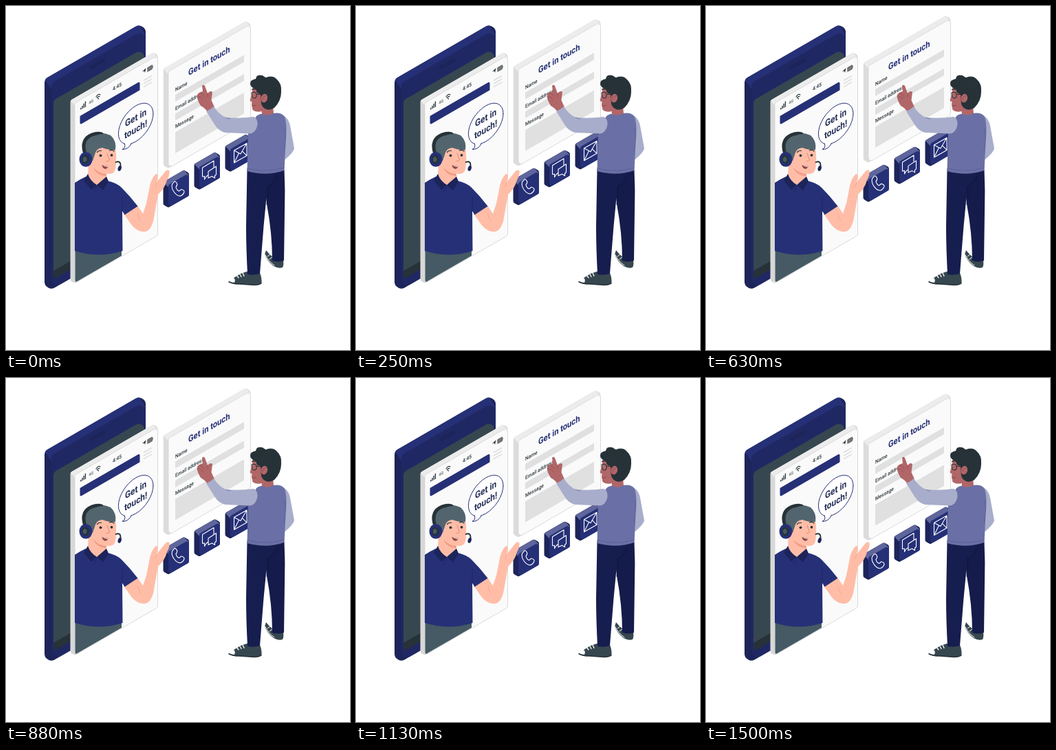
Write an HTML page with a canvas that moves like this. It is 500 by 500 pixels and loops after 1.54 s.

```html
<!DOCTYPE html>
<html lang="en">
<head>
<meta charset="utf-8">
<title>Get in touch</title>
<style>
html, body { margin: 0; width: 100%; height: 100%; overflow: hidden; background: #fff; }
canvas { display: block; width: 500px; height: 500px; }
</style>
</head>
<body>
<canvas id="stage" width="500" height="500"></canvas>
<script>
const ctx = document.getElementById('stage').getContext('2d');
const LOOP = 1540, STEPS = 37, LIFT = 10, SLOPE = Math.tan(Math.PI / 6);
const NAVY = '#263077', DEEP = '#1c2459', INK = '#263238', GREY = '#37474f';
const PEACH = '#ffbda7', BROWN = '#b16668', MAUVE = '#6a70a5', LILAC = '#a8adcb';

function fill(color, d) {
  ctx.fillStyle = color;
  ctx.fill(new Path2D(d));
}

function line(color, width, d) {
  ctx.strokeStyle = color;
  ctx.lineWidth = width;
  ctx.lineCap = ctx.lineJoin = 'round';
  ctx.stroke(new Path2D(d));
}

function oval(color, x, y, rx, ry = rx, turn = 0) {
  ctx.fillStyle = color;
  ctx.beginPath();
  ctx.ellipse(x, y, rx, ry, turn, 0, Math.PI * 2);
  ctx.fill();
}

function roundPoly(points, r) {
  const n = points.length, path = new Path2D();
  const [a, b] = [points[n - 1], points[0]];
  path.moveTo((a[0] + b[0]) / 2, (a[1] + b[1]) / 2);
  points.forEach((p, i) => path.arcTo(...p, ...points[(i + 1) % n], r));
  path.closePath();
  return path;
}

// Upright parallelogram on the isometric wall, from its top left corner.
function wall(x, y, w, h) {
  const rise = w * SLOPE;
  return [[x, y], [x + w, y - rise], [x + w, y - rise + h], [x, y + h]];
}

function pane(color, x, y, w, h, r = 0) {
  ctx.fillStyle = color;
  ctx.fill(roundPoly(wall(x, y, w, h), r));
}

function slab(x, y, w, h, depth, r, side, top, front, edge) {
  const [tl, tr, br, bl] = wall(x, y, w, h);
  const back = ([px, py]) => [px - depth, py - depth * SLOPE];
  const hull = roundPoly([back(tl), back(tr), tr, br, bl, back(bl)], r);
  ctx.fillStyle = side;
  ctx.fill(hull);
  ctx.save();
  ctx.clip(hull);
  ctx.fillStyle = top;
  ctx.fill(roundPoly([back(tl), back(tr), [tr[0], tr[1] + r], [tl[0], tl[1] + r]], 0));
  ctx.restore();
  const face = roundPoly([tl, tr, br, bl], r);
  ctx.fillStyle = front;
  ctx.fill(face);
  if (edge) {
    ctx.strokeStyle = edge;
    ctx.lineWidth = 0.7;
    ctx.stroke(face);
  }
}

function wallText(text, x, y, size, weight, color) {
  ctx.save();
  ctx.transform(0.866, -0.5, 0, 1, x, y);
  ctx.font = `${weight} ${size}px Roboto, sans-serif`;
  ctx.fillStyle = color;
  ctx.fillText(text, 0, 0);
  ctx.restore();
}

function drawPhone() {
  slab(66, 112, 137, 300, 10, 9, DEEP, NAVY, '#202864');
  pane(GREY, 69, 137, 132, 260, 8);
  fill(INK, 'M69 385L95 370V382L73 395Q69 397 69 392Z');
  line(DEEP, 5, 'M124 89L142 79');
}

function drawScreen() {
  slab(100, 141, 120.5, 262, 6.5, 4, '#d8d8d8', '#ececec', '#fafafa', '#cfcfcf');
  for (let i = 0; i < 4; i++) {
    line(INK, 1.3, `M${108.8 + i * 2.2} ${150 - i * 1.2}v${-1.5 - i * 1.9}`);
  }
  wallText('4G', 120.5, 143, 6, 400, INK);
  line(INK, 1.1, 'M131 132Q134 127 137 129M132.3 133.6Q134.5 130.6 136 131.6');
  oval(INK, 134.2, 134.6, 0.9);
  wallText('4:45', 155, 123.5, 7.6, 500, INK);
  fill(INK, 'M198 95.5L203.5 90L202 97L201 94.5Z');
  pane('#777', 206, 89.5, 6.5, 5.8, 1);
  line(INK, 0.6, 'M206 89.5L212.5 85.7V91.6L206 95.4ZM213.5 87.5V89');
  for (const y of [108, 112.7, 117.4]) line('#dedede', 1.6, `M200.5 ${y}L211.5 ${y - 6.3}`);
  pane(NAVY, 107.5, 160, 87, 12.5, 1.5);
}

function drawBubble() {
  ctx.save();
  ctx.transform(1, -SLOPE, 0, 1, 188.7, 171);
  oval('#fff', 0, 0, 25.3, 26);
  ctx.restore();
  ctx.strokeStyle = NAVY;
  ctx.lineWidth = 1;
  ctx.stroke();
  fill('#fff', 'M172 198Q175 205 169 208.5Q179 208 182 198Z');
  line(NAVY, 1, 'M172.3 200Q174.5 206 169 208.5Q178 208.5 182 200.5');
  wallText('Get in', 173, 176, 13.7, 700, '#263058');
  wallText('touch!', 172, 193.5, 13.7, 700, '#263058');
}

function drawForm() {
  slab(236, 95.3, 119.5, 140.5, 7.3, 4, '#dcdcdc', '#ececec', '#fafafa', '#d2d2d2');
  wallText('Get in touch', 265, 101.5, 12.9, 700, NAVY);
  [['Name', 124.5, 129, 10], ['Email address', 152, 156.5, 10], ['Message', 178, 183.5, 30.5]]
    .forEach(([label, base, top, h]) => {
      wallText(label, 246, base, 7.6, 500, INK);
      pane('#e0e0e0', 246, top, 100, h);
    });
}

const glyphs = [
  'M241.5 259Q240 264 244 270Q249 277 254 276Q258 274 259 270.5Q259.500 267.500 254.500 266.500' +
  'Q252.500 268.500 251.500 269Q248 267.500 247 263Q249.500 260.500 248.500 258Q246.500 254 244.500 255.500Z',
  'M293.500 246L291 248L288.500 252V247.500L285.500 248V235L302 225V234M294 240.500L305.500 233V245' +
  'L303.500 246.500V250L299.500 247.500L294 250Z',
  'M331.500 210L350 199.500V217.500L331.500 228ZM331.500 210L341 215L350 199.500M331.500 228L338.500 214M350 217.500L343.500 211'
];

function drawButtons() {
  glyphs.forEach((glyph, i) => {
    slab(236 + i * 45, 260 - i * 26, 30, 33, 7.5, 3.5, DEEP, '#5f669c', NAVY);
    line('#fff', 1.1, glyph);
  });
}

function drawAgent() {
  fill('#455a64', 'M100.500 354H168V363L103 400.500Q100.500 402 100.500 398Z');
  fill(PEACH, 'M171 302L191 290Q196 297 199 302L204 287L208 267Q210 251 218 244Q221 244 220.500 249' +
    'L219 256L232 240Q235 237.500 237.500 239.500Q238.500 245 234 253Q231 265 221 274' +
    'L214 313Q210 327 202 328Q192 329 183 319Z');
  line('#f29d87', 0.7, 'M219 256L217 263M191.500 302Q192 308 196 313');
  fill(NAVY, 'M100 257Q107 252 116 248L147 254Q161 257 168 264Q180 276 191.500 291L172.500 303.500L169 298' +
    'L169.500 356Q136 367 100 356Z');
  fill(PEACH, 'M120 228L119 246Q124 259 134 261Q144 258 147 253L145 240Z');
  fill('#f29d87', 'M127 235Q136 244 146 244L146 247Q132 247 127 235Z');
  fill(DEEP, 'M119 244L113 254L124 267L132 260Q122 254 119 244ZM132 260L146 248L149 255L141 268Z');
  line(DEEP, 0.8, 'M132 261L128 271M169 298V278');

  fill(PEACH, 'M120 205Q136 193 158 204Q161 214 160 228Q160 240 155 243Q148 246 138 241Q126 236 121 226Z');
  fill('#52656e', 'M114 214Q109 194 124 187Q139 182 152 188Q161 196 159 209Q152 210 140 206' +
    'Q132 207 130 213L126 225L120 226Z');
  line(INK, 5, 'M115 215Q108 194 125 187Q133 184 139 186');
  fill('#52656e', 'M119 211Q116 194 131 188Q144 183 154 191Q160 198 159 207Q150 210 139 205Q132 206 129 213L125 223Z');
  line(INK, 1.2, 'M132.500 212.500Q135 209.500 138.500 210.500M150.500 210Q154 208.500 157 211');
  oval(INK, 137.500, 217.300, 1.9);
  oval(INK, 153.500, 216.800, 1.9);
  line('#e88770', 1, 'M147 214Q149 220 150.500 224Q149 226.500 146 225.500');
  fill('#8f4547', 'M139.500 231Q144 233 148.500 232.500Q147 238 143 236.500Q140 235 139.500 231Z');
  fill('#fff', 'M140 231.300Q144 233.200 148.300 232.700L147.500 234Q143 234 140 231.300Z');
  oval(NAVY, 116, 223, 9.5, 10.8);
  oval(INK, 115.500, 223, 5.3, 6.300);
  oval('#455a64', 114.700, 223, 2.8, 3.7);
  line(INK, 1.8, 'M159.500 227Q167 224 166.500 233');
  oval(DEEP, 165.200, 236, 2.5, 4, 0.3);
}

function drawVisitor() {
  // legs and shoes
  fill(GREY, 'M378 355Q386 365 391 366L403 369Q404 377 402 380Q396 382 389 378Q379 370 376 361Z');
  line('#fff', 1, 'M376.500 361Q381 371 390 377M380 364L384 361M383 368L387 365');
  fill('#151c4b', 'M374 238H404.500Q406 268 405 298L404 370Q395 373 387 370Q387 330 379 288Z');
  fill(GREY, 'M323.500 400Q331 395 341 389L350 386L369 388Q372 395 371.500 403Q367 406 360 405.500L337 404Q325 404 323.500 400Z');
  fill('#fff', 'M323 398.500L331 395Q334 398 332 402Q325 402 323 398.500Z');
  line('#fff', 1.3, 'M335 391L338 395M339.500 389L342 393.500M344 388L346 392.500');
  line(INK, 1.4, 'M324 401Q330 404 339 404L360 405.500Q367 406 371 403');
  fill('#161d4f', 'M350.500 237H395Q387 256 380 263L374.500 320L369 389Q360 392 351 390Q349 350 349 320Z');
  line('#0f153d', 0.9, 'M380 263Q382 278 379 288M380 263Q391 259 394 247');

  // torso
  fill(LILAC, 'M399 158Q410 160 413 174L419 207Q418 213 404.500 224L400 205L407 198Z');
  fill(BROWN, 'M371 145L388 143L389 157Q381 162 372 158Z');
  fill(MAUVE, 'M364 160Q370 156 373 157Q381 161 388 156Q400 154 405 161Q409 172 406.500 198L404.500 239' +
    'Q379 248 350.500 240L351.500 200L352 180Z');
  line('#595f95', 0.8, 'M350.500 236Q379 243 404.500 235M405 178Q408 195 404 211');

  // pointing arm
  fill(BROWN, 'M285 116Q287 113.500 289 116L293 127Q297 122 300 125L298.500 137L303 147L293 154Q289 148 283 145' +
    'Q278 137 277.500 131Q278 126 286 124Z');
  line('#8d4b51', 0.7, 'M281 127Q287 128 288 132M279 132Q285 132 286 136M293 127L293 132');
  fill(LILAC, 'M302 146Q309 157 319 162Q340 164 360 161Q366 163 365.500 173Q363 185 354 185.500' +
    'L319 184Q309 182 303 172L291 153Q297 151 302 146Z');
  line('#595f95', 0.6, 'M319 162Q322 164 326 164');

  // head
  fill(BROWN, 'M359 115L357.500 128L354.500 137Q355 139 357.500 139L357 143L358.500 151Q363 155 372 153L384 149L386 120Z');
  fill(INK, 'M359 119Q353 115 356 109Q360 106 363 106Q364 99 373 101Q377 104 378 104Q388 100 394 107' +
    'Q401 113 400 125Q400 138 390 148Q384 152 378 150Q372 147 371 142L370 128Q363 127 364 121Z');
  oval(BROWN, 375.300, 134, 4.8, 6.300, 0.2);
  line('#8d4b51', 0.8, 'M373 136Q373 130 377.500 131');
  line(INK, 1.1, 'M357 126Q362 124 364 127Q365 134 361 134Q357 134 357 126M364 128L373 129');
  line(INK, 1.3, 'M357.500 121.500Q361 119.500 364 121.500');
  line('#7e3f46', 0.9, 'M358 145Q361 146 363 144.500');
}

function render(now) {
  const step = Math.floor(((now % LOOP) + 5) / LOOP * STEPS);
  const phase = (step / STEPS + 45 / LOOP) % 1;
  const lift = LIFT * (1 - Math.abs(1 - 2 * phase));
  ctx.clearRect(0, 0, 500, 500);
  drawPhone();
  drawScreen();
  drawBubble();
  ctx.save();
  ctx.translate(0, 0.6 - lift);
  drawForm();
  drawButtons();
  ctx.restore();
  drawAgent();
  drawVisitor();
}

const start = performance.now();
function tick() {
  render(performance.now() - start);
  requestAnimationFrame(tick);
}
tick();
</script>
</body>
</html>
```
